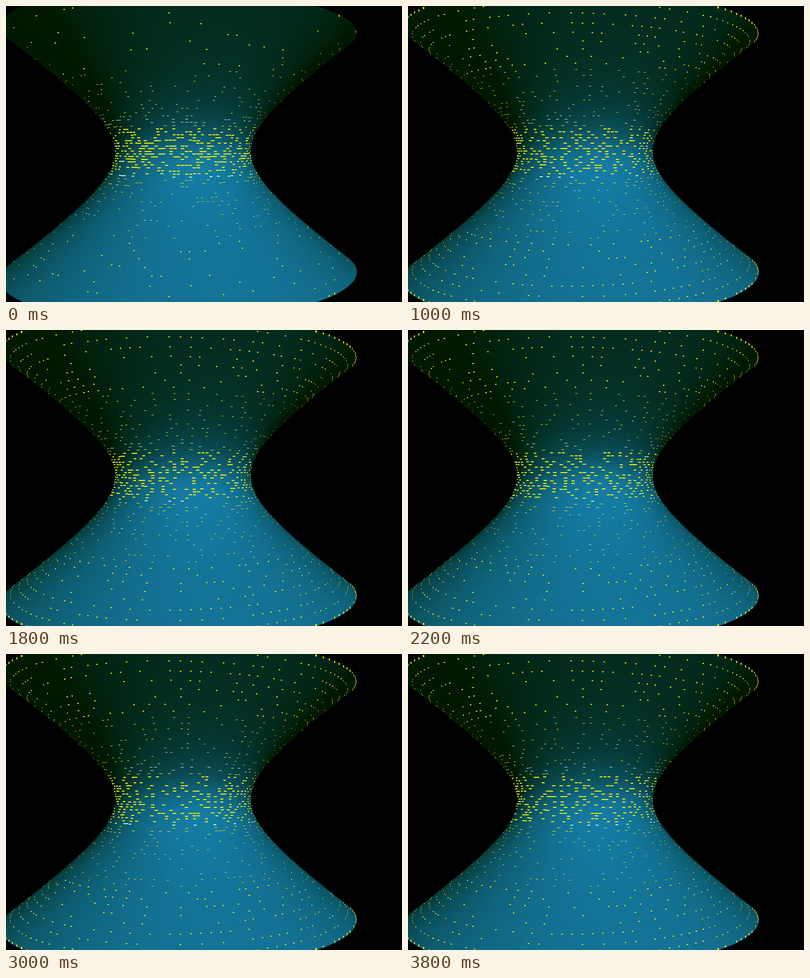
An HTML page with a canvas for the animation above (4000 ms loop, 800 by 600 pixels).

```html
<!DOCTYPE html>
<html lang="en">
<head>
<meta charset="utf-8">
<title>Cells on a hyperboloid</title>
<style>
  html, body { margin: 0; width: 100%; height: 100%; overflow: hidden; background: #000; }
  canvas { display: block; }
</style>
</head>
<body>
<canvas id="stage" width="800" height="600"></canvas>
<script>
const ROWS = 64, COLS = 128, STEPS = 20, STEP_MS = 200;
const WAIST = 0.1419, RISE = 0.1008, FOCAL = 950;
const RIM = 1.563, ROW_GAP = 0.0495;
const LIGHT = [0.255, 0.454, 0.854];
const ctx = document.getElementById('stage').getContext('2d');

// Surface point at height s (-RIM top, RIM bottom) and angle a (0 faces the viewer)
function place(s, a) {
  const r = WAIST * Math.cosh(s);
  const X = r * Math.sin(a) - 0.079;
  const Y = RISE * Math.sinh(s) + 0.0138;
  const Z = 1 - r * Math.cos(a);
  const radial = RISE * Math.cosh(s), rise = WAIST * Math.sinh(s);
  const len = Math.hypot(radial, rise);
  const nr = radial / len, up = rise / len;
  const nx = nr * Math.sin(a), nz = nr * Math.cos(a);
  return {
    x: 434 + FOCAL * X / Z,
    y: 282.3 + FOCAL * Y / Z,
    facing: (up * Y + nz * Z - nx * X) / Math.hypot(X, Y, Z),
    lit: Math.max(0, nx * LIGHT[0] + up * LIGHT[1] + nz * LIGHT[2])
  };
}

function paintSurface() {
  const layer = document.createElement('canvas');
  layer.width = 800;
  layer.height = 600;
  const g = layer.getContext('2d');
  g.fillRect(0, 0, 800, 600);
  g.lineWidth = 0.8;
  const ds = RIM / 64, da = Math.PI / 256;
  for (let j = -64; j < 64; j++) {
    for (let i = -136; i < 136; i++) {
      const s = j * ds, a = i * da;
      const mid = place(s + ds / 2, a + da / 2);
      if (mid.facing <= 0) continue;
      const d = mid.lit;
      g.fillStyle = g.strokeStyle = `rgb(${22 * d},${26 + 100 * d},${167 * d})`;
      g.beginPath();
      for (const [u, v] of [[0, 0], [1, 0], [1, 1], [0, 1]]) {
        const p = place(s + v * ds, a + u * da);
        g.lineTo(p.x, p.y);
      }
      g.closePath();
      g.fill();
      g.stroke();
    }
  }
  return layer;
}

// Repeatable random number in 0..1
function rand(i, j, k) {
  let h = Math.imul(i + 211, 374761393) ^ Math.imul(j + 97, 668265263) ^ Math.imul(k + 31, 1274126177);
  h = Math.imul(h ^ (h >>> 13), 1103515245);
  h = Math.imul(h ^ (h >>> 16), 2246822519);
  return ((h ^ (h >>> 15)) >>> 0) / 4294967296;
}

const rowHeight = j => (j + 0.5 - ROWS / 2) * ROW_GAP;

function density(edge, s) {
  if (edge < 2) return 0.85;
  if (edge < 4) return 0.58;
  if (edge < 11) return 0.42;
  return 0.2 + 0.14 * Math.exp(-((s / 0.45) ** 2));
}

// Cells start scattered, settle within a few steps, then some keep changing
function alive(i, j, step) {
  const edge = Math.min(j, ROWS - 1 - j);
  const s = rowHeight(j);
  if (rand(i, j, 500) * 4 >= step) {
    return rand(i, j, 900 + step) < 0.13 + 0.25 * Math.exp(-((s / 0.55) ** 2));
  }
  const stay = edge < 2 ? 1 : edge < 11 ? 0.85 : 0.35;
  const raw = n => rand(n, j, rand(n, j, 700) < stay ? 99 : step) < density(edge, s);
  return raw(i) && (edge < 4 || !raw(i - 1) || rand(i, j, 800) < 0.4);
}

const dots = [];
for (let j = 0; j < ROWS; j++) {
  const s = rowHeight(j);
  const dist = Math.abs(s);
  for (let i = -36; i < 36; i++) {
    const a = (i + 0.3) * 2 * Math.PI / COLS;
    const p = place(s, a);
    if (p.facing < 0.04) continue;
    const side = Math.cos(a);
    const wide = dist < 0.3 ? 8 : dist < 0.6 ? 7 : dist < 1.12 ? 5 : 4;
    const w = Math.max(1, Math.floor(wide * side));
    let h = dist < 0.45 || dist > 1.12 ? 2 : 1;
    if (dist > 1.55 && side < 0.8) h = 4;
    const pale = dist > 0.4 && dist < 1.12 ? rand(0, j, 7) < 0.35 : side < 0.65 && rand(i, j, 8) < 0.15;
    dots.push({
      i, j, w, h,
      x: Math.round(p.x - w / 2),
      y: Math.round(p.y - h / 2),
      color: pale ? '#b4f5dc' : '#f0f00c'
    });
  }
}

const surface = paintSurface();
let shown = -1;

function frame(now) {
  const step = Math.floor(now / STEP_MS) % STEPS;
  if (step !== shown) {
    shown = step;
    ctx.drawImage(surface, 0, 0);
    for (const d of dots) {
      if (!alive(d.i, d.j, step)) continue;
      ctx.fillStyle = d.color;
      ctx.fillRect(d.x, d.y, d.w, d.h);
    }
  }
  requestAnimationFrame(frame);
}
frame(0);
</script>
</body>
</html>
```
